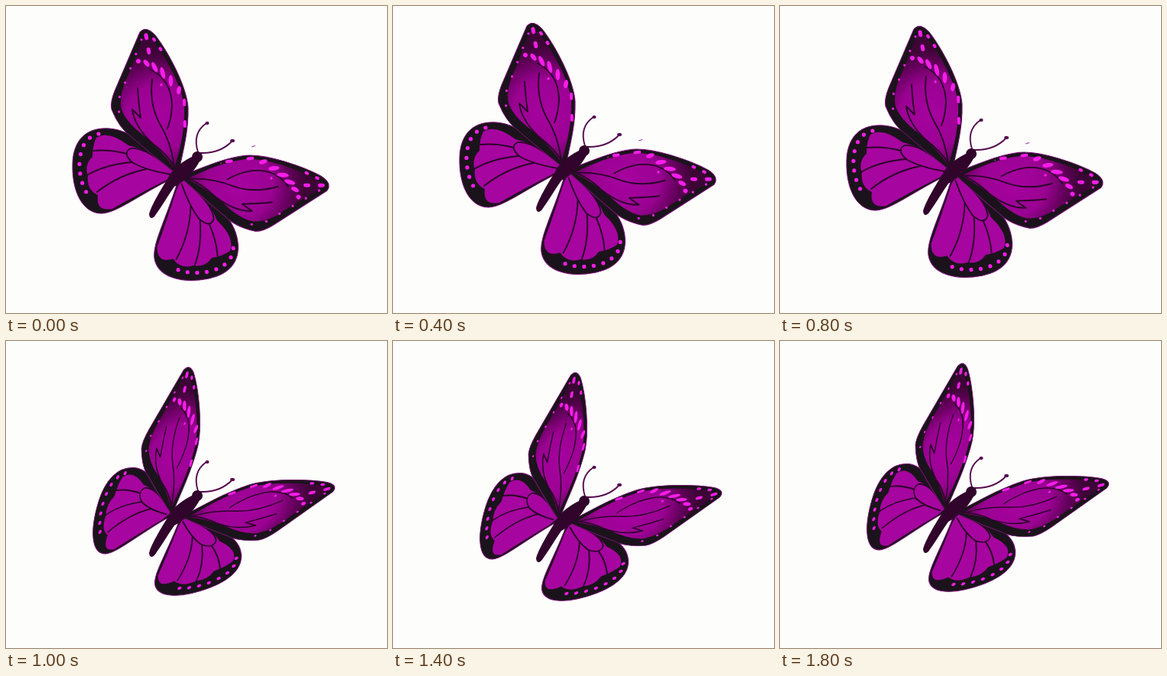
Recreate the animation shown at these times as an HTML page. Size 498 px wide and 401 px high, loop 2 s.

```html
<!DOCTYPE html>
<html lang="en">
<head>
<meta charset="utf-8">
<title>Butterfly</title>
<style>
  html, body { margin: 0; width: 100%; height: 100%; overflow: hidden; background: #fdfefc; }
  svg { display: block; }
  .edge { fill: #1b131b; stroke: #7d1079; stroke-width: 1; }
  .vein { fill: none; stroke: #2a0428; stroke-width: 1.9; stroke-linecap: round; stroke-linejoin: round; }
  .dots { fill: none; stroke: #f51ee9; stroke-linecap: round; }
  .body { fill: #31052b; }
  .feeler { fill: none; stroke: #560b50; stroke-width: 1.9; stroke-linecap: round; }
</style>
</head>
<body>
<svg width="498" height="401" viewBox="0 0 498 401">
  <defs>
    <radialGradient id="foreFill" gradientUnits="userSpaceOnUse" cx="200" cy="146" r="86">
      <stop offset="0" stop-color="#a6029f"/>
      <stop offset=".5" stop-color="#9a0292"/>
      <stop offset=".78" stop-color="#64005b"/>
      <stop offset="1" stop-color="#3d0536"/>
    </radialGradient>
    <g id="wing">
      <path class="edge" d="M225 222C190 186 165 162 135 160C105 158 88 175 87 206C86 244 101 271 125 271C144 270 166 252 212 228Z"/>
      <path fill="#a6059f" d="M118 172Q134 162 160 182Q195 190 221 219L210 227Q165 250 139 265Q117 269 120 247Q105 240 107 222Q102 207 113 197Q113 182 118 172Z"/>
      <path class="vein" d="M217 214Q182 184 163 186Q151 192 166 205Q185 215 215 220M158 193Q135 187 114 189M164 204Q130 207 106 221M184 213Q148 220 119 243"/>
      <path class="edge" d="M225 221C231 190 239 164 238 132C236 104 211 58 195 38Q183 25 175 34L142 111Q136 126 138 135Q148 160 164 171Q188 192 225 221Z"/>
      <path fill="url(#foreFill)" d="M220 212C228 186 234 160 233 133C231 105 205 58 186 39Q181 36 178 44L160 90Q147 115 151 135Q157 152 181 170Q203 188 220 212Z"/>
      <path class="vein" d="M172 107Q173 125 176 146L165 135Q168 158 192 180Q210 193 221 211M191 96Q187 128 201 154Q216 178 220 210M189 83Q216 96 217 130Q216 148 211 160"/>
      <!-- rows of dots along the margins -->
      <path class="dots" stroke-width="5.2" stroke-dasharray="0 12.6" d="M121 167Q98 172 96 205Q96 235 112 253"/>
      <path class="dots" stroke-width="3.2" stroke-dasharray="0 20" d="M177 44L146 125Q146 140 154 152"/>
      <path class="dots" stroke-width="4" stroke-dasharray="2 13" d="M193 43L204 59"/>
      <path class="dots" stroke-width="5" stroke-dasharray="4 15" d="M183 38L187 62"/>
      <path class="dots" stroke-width="4" stroke-dasharray="6 22" d="M233 123L234 160"/>
      <path class="dots" stroke-width="3.4" d="M203 103h.1"/>
      <g id="band" fill="#f51ee9"></g>
    </g>
  </defs>
  <g id="butterfly">
    <g id="left"><use href="#wing"/></g>
    <g id="right"><use href="#wing" transform="matrix(-.163 -.986 -.986 .163 481.5 408.4)"/></g>
    <g id="trunk">
      <path class="feeler" d="M251 191Q243 166 262 153M254 192Q280 193 296 176"/>
      <path class="feeler" stroke-linecap="round" style="stroke-width:4" d="M262.5 153h1M295 176h2"/>
      <path class="body" d="M245 196C235 201 218 210 211 226C203 239 190 260 187 272Q188 280 194 275C204 261 213 246 220 236C236 228 247 214 253 203Z"/>
      <circle class="body" cx="250" cy="197" r="7"/>
    </g>
    <path id="specks" d="M321 184l5 -1.5M280 206l2 -1" stroke="#a03a9c" stroke-width="1.2"/>
  </g>
</svg>
<script>
  const byId = id => document.getElementById(id);

  // Curved band of long spots below the wing tip, turning as it goes
  const BAND = 5;
  for (let i = 0; i <= BAND; i++) {
    const t = i / BAND;
    const x = 173 + 53 * t, y = 72 + 8 * t + 30 * t * t;
    const length = 3 + 5 * Math.sin(2.6 * t);
    byId('band').innerHTML +=
      `<ellipse rx="2.9" ry="${length}" transform="translate(${x} ${y}) rotate(${60 * t - 50})"/>`;
  }

  const STEP = 200;
  const bob = [0, -6, -8, -12, -4, 4, 8, 11, 11, -1];
  const folded = {
    left: 'matrix(.73 0 -.277 1.012 113.7 -.3)',
    right: 'matrix(1.03 -.243 0 .76 -5 111.6)',
    trunk: 'translate(0 1)'
  };

  function draw() {
    const step = Math.floor(performance.now() / STEP) % bob.length;
    const isFolded = step % 2 === 1;
    byId('butterfly').setAttribute('transform', `translate(0 ${bob[step]})`);
    for (const part in folded) byId(part).setAttribute('transform', isFolded ? folded[part] : '');
    byId('specks').setAttribute('opacity', isFolded ? 0 : 1);
    requestAnimationFrame(draw);
  }
  draw();
</script>
</body>
</html>
```
